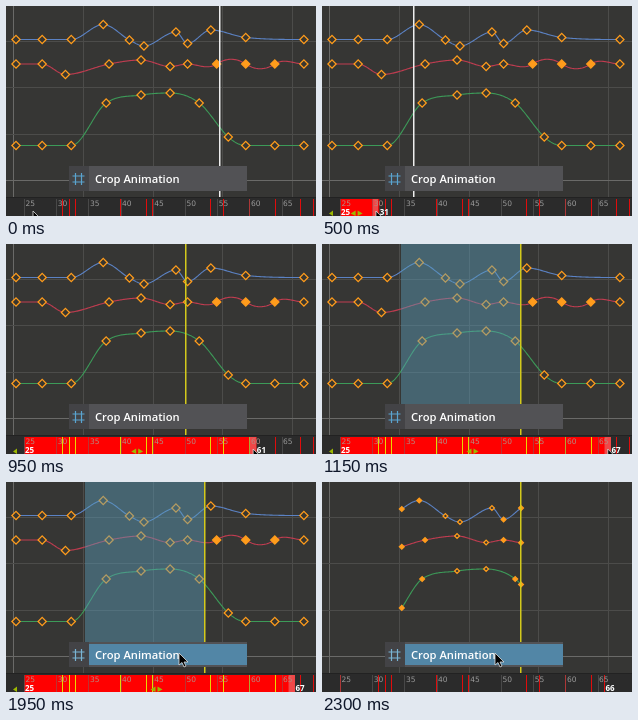
Write an HTML page with a canvas that moves like this. It is 310 px wide and 210 px high and loops after 2.85 s.

```html
<!DOCTYPE html>
<html lang="en">
<head>
<meta charset="utf-8">
<title>Crop Animation</title>
<style>
html, body { margin: 0; width: 310px; height: 210px; overflow: hidden; background: #363634; }
canvas { display: block; }
</style>
</head>
<body>
<canvas id="stage" width="310" height="210"></canvas>
<script>
const g = document.getElementById('stage').getContext('2d');
const LOOP = 2850, STEP = 50, FIRST = 25, LAST = 66;
const PRESS = 100, RELEASE = 1150, LEAVE = 1550, HOVER = 1750, CROP = 2150;
const ORANGE = '#ff9c1c', YELLOW = '#d3c91c';

// Frame number to x: in the graph and on the ruler
const graphX = f => 7.1 + 2.908 * f;
const rulerX = f => 18.5 + 6.44 * (f - FIRST);

const clamp = (v, lo, hi) => Math.min(hi, Math.max(lo, v));
const smooth = u => u * u * (3 - 2 * u);

// The drag sweeps the end of the range from the first frame past the last
const dragEnd = t => FIRST + (LAST + 1 - FIRST) * smooth(clamp((t - 300) / 850, 0, 1));

// The last four red keys are a wave: steep tangents that alternate
const waveSlope = f => f >= 70 && f < 100 ? (f % 20 ? -.65 : .65) : null;

const curves = [
  makeCurve('#5b82c4', [1, 10, 20, 31, 40, 45, 56, 60, 68, 80, 100],
    [33.5, 33.5, 33.5, 18.5, 34, 40, 26, 37.5, 24, 31.5, 33.5]),
  makeCurve('#c03c50', [1, 10, 18, 33, 44, 54, 60, 70, 80, 90, 100],
    [58, 58, 68.5, 58, 54, 60.5, 58, 58, 58, 58, 58], waveSlope),
  makeCurve('#3c9a58', [1, 10, 20, 32, 44, 54, 64, 74, 80, 90, 100],
    [139.5, 139.5, 139.5, 97, 89, 87, 97, 131, 139.5, 139.5, 139.5])
];
const keyFrames = [...new Set(curves.flatMap(c => c.frames))];

function makeCurve(color, frames, ys, fixed = () => null) {
  const xs = frames.map(graphX);
  const slopes = frames.map((f, i) => fixed(f) ?? autoSlope(xs, ys, i));
  return { color, frames, xs, ys, slopes, solid: f => fixed(f) !== null };
}

// Flat at extremes, otherwise the central difference without overshoot
function autoSlope(xs, ys, i) {
  if (!i || i === xs.length - 1) return 0;
  const rise = (a, b) => (ys[b] - ys[a]) / (xs[b] - xs[a]);
  const before = rise(i - 1, i), after = rise(i, i + 1);
  if (before * after <= 0) return 0;
  const limit = 3 * Math.min(Math.abs(before), Math.abs(after));
  return clamp(rise(i - 1, i + 1), -limit, limit);
}

function valueAt({ xs, ys, slopes }, x) {
  const j = Math.max(1, xs.findIndex(k => x <= k)), i = j - 1;
  const h = xs[j] - xs[i], u = (x - xs[i]) / h, v = 1 - u;
  return ys[i] * v * v * (1 + 2 * u) + ys[j] * u * u * (1 + 2 * v)
    + h * u * v * (slopes[i] * v - slopes[j] * u);
}

function rect(color, x, y, w, h) {
  g.fillStyle = color;
  g.fillRect(x, y, w, h);
}

function text(str, x, y, font, color) {
  g.font = font;
  g.fillStyle = color;
  g.fillText(str, x, y);
}

function poly(points, color) {
  g.beginPath();
  points.forEach(([x, y]) => g.lineTo(x, y));
  g.closePath();
  g.fillStyle = color;
  g.fill();
}

function outline(color, width) {
  g.strokeStyle = color;
  g.lineWidth = width;
  g.stroke();
}

function diamond(x, y, r, solid) {
  poly([[x, y - r], [x + r, y], [x, y + r], [x - r, y]], solid ? ORANGE : '#383630');
  outline(ORANGE, 1.3);
}

function drawGrid() {
  rect('#363634', 0, 0, 310, 210);
  for (let k = 0; k < 5; k++) rect(k ? '#4c4c4a' : '#6a6a68', Math.round(graphX(24 * k)), 0, 1, 191);
  for (let k = 0; k < 4; k++) rect(k < 3 ? '#4c4c4a' : '#6a6a68', 0, Math.floor(35 + 46.5 * k), 310, 1);
}

function drawCurve(c, cropped) {
  const frames = cropped ? [FIRST, ...c.frames.filter(f => f > FIRST && f < LAST), LAST] : c.frames;
  const last = frames.length - 1, to = graphX(frames[last]);
  g.beginPath();
  for (let x = graphX(frames[0]); x < to; x++) g.lineTo(x, valueAt(c, x));
  g.lineTo(to, valueAt(c, to));
  outline(c.color, 1.1);
  frames.forEach((f, i) => {
    const x = graphX(f), solid = cropped ? i < 2 || i > last - 2 : c.solid(f);
    diamond(x, valueAt(c, x), cropped ? 2.4 : 4.1, solid);
  });
}

function drawButton(hot) {
  rect('#525255', 63, 160, 178, 25);
  rect('#434346', 63, 160, 20, 25);
  if (hot) rect('#5286a6', 83, 162, 158, 21);
  g.beginPath();
  for (const p of [69.5, 75.5]) {
    g.moveTo(p, 167); g.lineTo(p, 179);
    g.moveTo(66.5, p + 100.5); g.lineTo(78.5, p + 100.5);
  }
  outline(hot ? '#79b4d4' : '#5aa4d0', 1.2);
  text('Crop Animation', 89, 177, '600 11.2px "Open Sans", "Noto Sans", sans-serif', '#fff');
}

function drawRuler(end, done) {
  const small = '7.5px "DejaVu Sans", sans-serif', bold = 'bold 8px "Open Sans", sans-serif';
  const x0 = rulerX(FIRST), x1 = rulerX(end), head = rulerX(end - 1);
  rect('#2b2b2b', 0, 191, 310, 19);
  rect('#222', 0, 191, 310, 1);
  if (end) {
    rect('#f00', x0, 193, x1 - x0, 17);
    rect('#f04848', head, 193, x1 - head, 17);
  }
  const keys = done ? [FIRST, ...keyFrames.filter(f => f > FIRST && f < LAST), LAST] : keyFrames;
  for (const f of keys) rect(f < end ? '#e6d800' : '#e00c0c', Math.round(rulerX(f)) - 1, 193, 1, 17);
  for (let f = FIRST; f <= 65; f += 5) {
    rect('rgba(110,110,110,.45)', Math.floor(rulerX(f)), 193, 1, 17);
    text(f, rulerX(f) + 1, 200, small, f < end ? '#b58a80' : '#999');
  }
  if (end) {
    const mid = (x0 + head) / 2;
    for (const [x, w] of [[7, 4], [mid - 6, 5], [mid + 6, -5]])
      poly([[x, 207.5], [x + w, 204.5], [x + w, 210]], '#9cb800');
    text(FIRST, x0 + .5, 208.5, bold, '#fff');
    text(end, x1 + .5, 209, bold, '#fff');
  }
  if (done) text(LAST, 283.5, 208.5, bold, '#fff');
}

function drawCursor(x, y) {
  const shape = [[0, 0], [0, 12], [3, 9.5], [5, 14], [7, 13], [5, 9], [9, 9]];
  poly(shape.map(([a, b]) => [x + a, y + b]), '#000');
  outline('#ddd', .8);
}

function draw(t) {
  const started = t >= PRESS, done = t >= CROP + 100;
  const end = Math.max(FIRST + 1, Math.round(dragEnd(t)));
  drawGrid();
  curves.forEach(c => drawCurve(c, t >= CROP));
  if (t >= RELEASE && t < CROP + 50) rect('rgba(90,156,184,.45)', 79, 0, 120, 185);
  const head = started ? Math.max(FIRST, dragEnd(t - 10) - 1) : 71;
  rect(t < 600 ? '#eee' : YELLOW, Math.round(graphX(head)) - 1, 0, 1.5, 191);
  drawButton(t >= HOVER);
  drawRuler(started && !done ? end : 0, done);
  if (t < LEAVE) drawCursor(Math.max(27, rulerX(end - .5)), 205);
  if (t >= HOVER) drawCursor(173 + 30 * clamp(1 - (t - HOVER) / 200, 0, 1) ** 2, 171);
}

function tick(now) {
  draw(Math.floor(now % LOOP / STEP) * STEP);
  requestAnimationFrame(tick);
}
requestAnimationFrame(tick);
</script>
</body>
</html>
```
